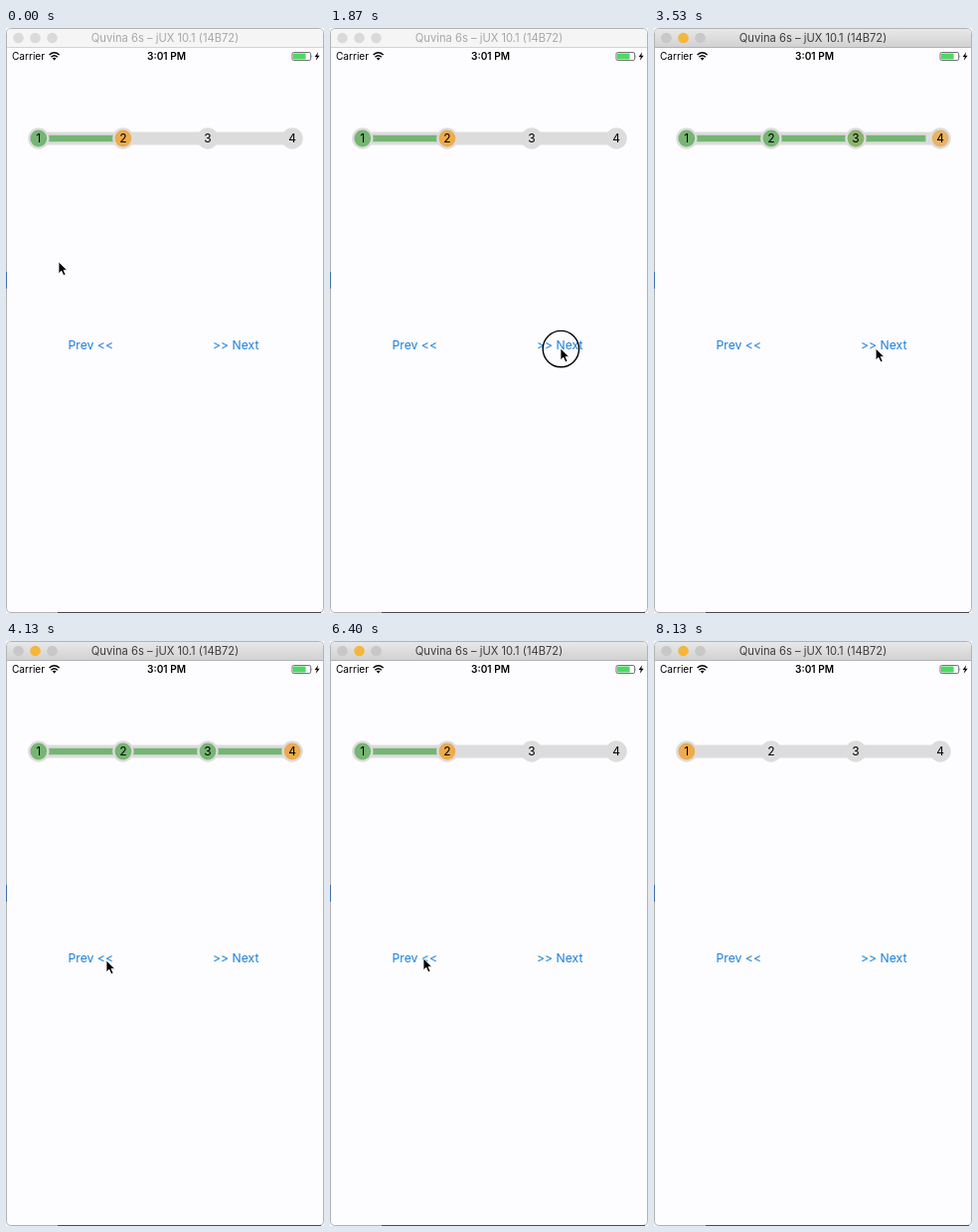
Animation, 320 px wide and 588 px high, one loop 8.27 s. Source, as an HTML page:

```html
<!DOCTYPE html>
<html lang="en">
<head>
<meta charset="utf-8">
<title>Step progress bar</title>
<style>
  html, body { margin: 0; width: 100%; height: 100%; overflow: hidden; background: #fff; }
  svg { display: block; width: 320px; height: 588px; font-family: Inter, Roboto, sans-serif; }
  .button { font-size: 12.2px; fill: #1a7fd9; }
  .number { font-size: 12px; text-anchor: middle; }
</style>
</head>
<body>
<svg viewBox="0 0 320 588">
  <defs>
    <linearGradient id="chrome" x2="0" y2="1">
      <stop stop-color="#e9e8e9"/><stop offset="1" stop-color="#d2d1d2"/>
    </linearGradient>
  </defs>
  <rect x=".5" y=".5" width="319" height="587" rx="4" fill="#fdfcfe" stroke="#b4b3b4"/>
  <path id="bar" d="M1 19.5V5Q1 1 5 1H315Q319 1 319 5V19.5Z"/>
  <path id="barEdge" d="M1 19.5H319"/>
  <g id="lights"><circle cx="12.5" cy="10" r="5.3"/><circle id="amber" cx="29.5" cy="10" r="5.3"/><circle cx="46.5" cy="10" r="5.3"/></g>
  <text id="title" x="160" y="14.2" font-size="11.2" text-anchor="middle">Quvina 6s – jUX 10.1 (14B72)</text>
  <path d="M.5 245v17" stroke="#3f6fae"/>
  <path d="M52 587.5H317" stroke="#4a4a4c"/>

  <text x="6" y="32" font-size="10.1">Carrier</text>
  <g fill="none" stroke="#000" stroke-width="1.4">
    <path d="M43.6 27.1Q48.6 22.6 53.6 27.1M45.4 29.2Q48.6 26.4 51.8 29.2"/>
  </g>
  <path d="M46.7 30.5Q48.6 29 50.5 30.5L48.6 32.4Z"/>
  <text x="161.5" y="32" font-size="10.1" font-weight="600" text-anchor="middle">3:01 PM</text>
  <rect x="288" y="24.5" width="18.6" height="8" rx="1.5" fill="#fdfcfe" stroke="#555" stroke-width=".8"/>
  <rect x="289" y="25.5" width="12.6" height="6" rx=".6" fill="#4cd964"/>
  <path d="M307.6 27q1.3 1.5 0 3Z" fill="#555"/>
  <path d="M314.2 24.3L310.6 29H312.8L311.8 32.7L315.6 27.7H313.3Z"/>

  <path d="M33 111H288" stroke="#dddcdd" stroke-width="13"/>
  <path id="progress" stroke="#74b573" stroke-width="6.4"/>
  <g id="points"></g>
  <text id="prev" class="button" x="62.5" y="323">Prev &lt;&lt;</text>
  <text id="next" class="button" x="208" y="323">&gt;&gt; Next</text>

  <g id="pointer">
    <circle id="ring" cy=".6" cx=".4" r="18.2" fill="none" stroke="#000" stroke-width="1.4"/>
    <path d="M0 0V11.8L2.8 9.2L4.9 13.8L7 12.9L5 8.4H8.6Z" stroke="#fff" stroke-width=".8"/>
  </g>
</svg>
<script>
const LOOP = 8270, ACTIVE_AT = 1900, SLIDE = 400, HIDE_AT = 7700;
const $ = id => document.getElementById(id);
const clamp = v => Math.max(0, Math.min(1, v));
const set = (el, attrs) => { for (const k in attrs) el.setAttribute(k, attrs[k]); };
const pointX = i => 32.8 + 85.1 * i;

// press time, release time, button, step change
const clicks = [
  [1800, 1930, 'next', 1],
  [3070, 3200, 'next', 1],
  [4140, 4270, 'prev', -1],
  [4800, 4930, 'prev', -1],
  [6600, 6735, 'prev', -1]
];
// time, x, y of the pointer tip
const path = [
  [0, 53, 235], [250, 53, 235], [870, 140, 290], [1450, 226, 333],
  [1750, 232, 322], [3450, 232, 322], [3950, 106, 323],
  [4110, 101, 321], [4140, 101, 321], [4190, 94, 319], [LOOP, 94, 319]
];

function make(tag, attrs) {
  const el = document.createElementNS('http://www.w3.org/2000/svg', tag);
  set(el, attrs);
  return $('points').appendChild(el);
}

const points = [0, 1, 2, 3].map(i => {
  const disc = (r, fill) => make('circle', { cx: pointX(i), cy: 111, r, fill });
  disc(10.7, '#dddcdd');
  const done = disc(8.4, '#76b574'), current = disc(8.4, '#ecab4d');
  make('text', { class: 'number', x: pointX(i), y: 115.4 }).textContent = i + 1;
  return { done, current };
});

function pointerAt(t) {
  const n = path.findIndex(p => p[0] > t);
  const [t0, x0, y0] = path[n - 1], [t1, x1, y1] = path[n];
  const u = (t - t0) / (t1 - t0), e = u * u * (3 - 2 * u);
  return [x0 + (x1 - x0) * e, y0 + (y1 - y0) * e];
}

function draw(t) {
  const active = t >= ACTIVE_AT;
  set($('bar'), { fill: active ? 'url(#chrome)' : '#f6f5f6' });
  set($('barEdge'), { stroke: active ? '#b3b2b3' : '#d4d3d4' });
  set($('title'), { fill: active ? '#3d3d3d' : '#a8a7a8' });
  set($('lights'), { fill: active ? '#c9c8c9' : '#dbdadb' });
  set($('amber'), { fill: active ? '#f6b63c' : '#dbdadb' });

  let step = 1, pressed = false;
  const opacity = { prev: 1, next: 1 };
  for (const [down, up, button, change] of clicks) {
    step += change * clamp((t - up) / SLIDE);
    if (t >= down && t < up) pressed = true;
    if (active && t >= down + 30) opacity[button] = 0.2 + 0.8 * clamp((t - up) / 300);
  }
  for (const button in opacity) set($(button), { opacity: opacity[button] });

  set($('progress'), { d: `M${pointX(0)} 111H${pointX(step)}` });
  points.forEach(({ done, current }, i) => {
    set(done, { opacity: step > i + 1e-6 ? 1 : 0 });
    set(current, { opacity: clamp(1 - Math.abs(step - i)) });
  });

  set($('pointer'), { transform: `translate(${pointerAt(t)})`, opacity: t < HIDE_AT ? 1 : 0 });
  set($('ring'), { opacity: pressed ? 1 : 0 });
}

const start = performance.now();
function tick() {
  draw((performance.now() - start) % LOOP);
  requestAnimationFrame(tick);
}
tick();
</script>
</body>
</html>
```
